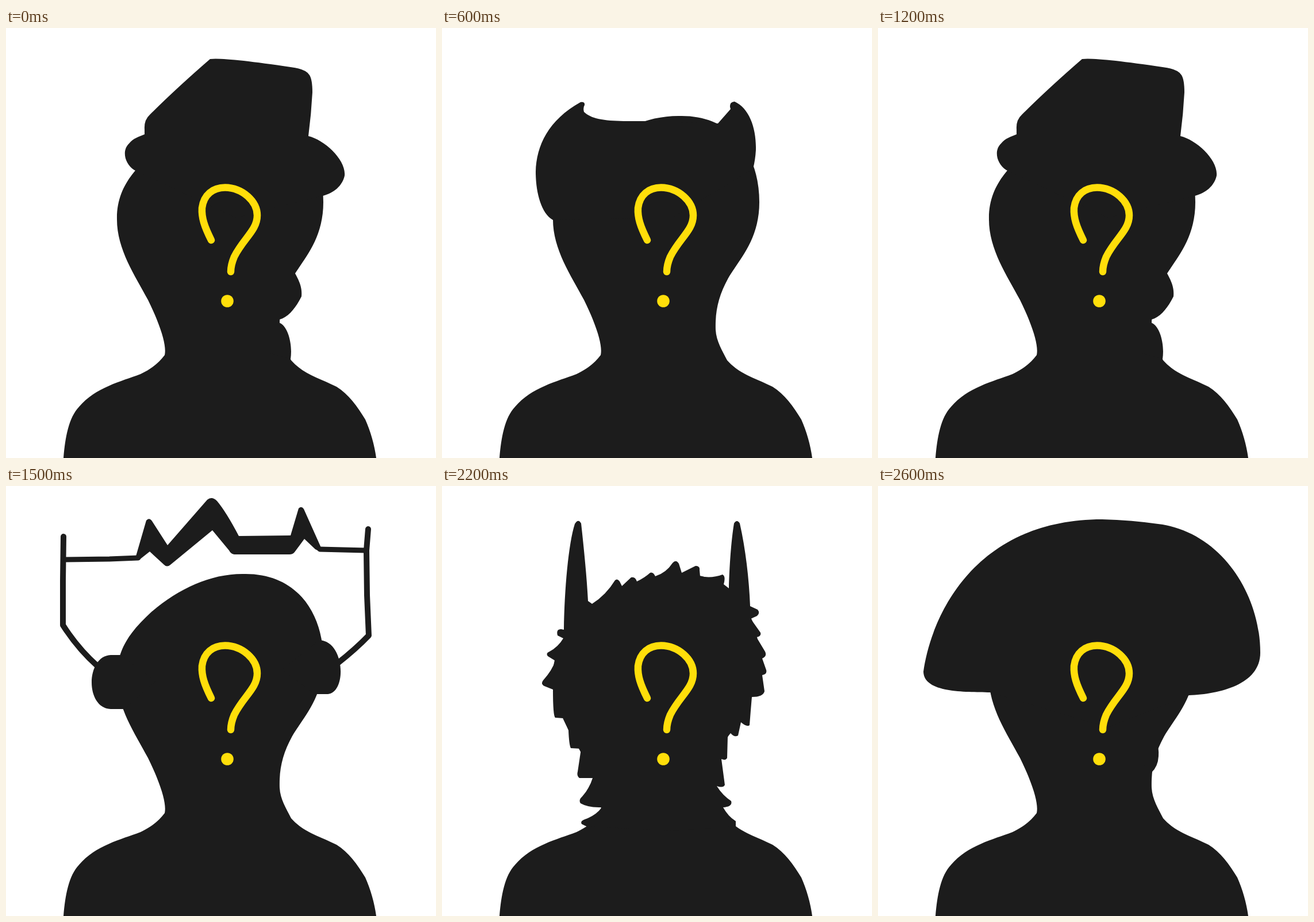
An HTML page that plays this animation: 748 px wide and 748 px high, repeating every 2700 ms.

```html
<!DOCTYPE html>
<html lang="en">
<head>
<meta charset="utf-8">
<title>Guess who</title>
<style>
  html, body { margin: 0; width: 100%; height: 100%; overflow: hidden; background: #fff; }
  svg { display: block; width: 100vw; height: 100vh; fill: #1c1c1c; }
  .look { visibility: hidden; }
  .line { fill: none; stroke: #1c1c1c; stroke-width: 10; stroke-linecap: round; stroke-linejoin: round; }
  .mark { fill: none; stroke: #ffde0a; stroke-width: 12.5; stroke-linecap: round; }
  .dot { fill: #ffde0a; }
</style>
</head>
<body>
<svg viewBox="0 0 748 748">
  <path d="M100 748C103 712 109 678 127 659C156 625 200 615 234 602C255 592 267 581 276 569C280 552 268 516 247 473C224 430 193 385 193 333C192 280 222 248 253 219C300 179 355 153 411 153C505 150 552 220 552 303C552 370 515 405 498 435C481 466 475 492 476 525C477 545 488 562 496 578C517 602 545 609 575 624C596 637 611 658 625 681C634 701 641 725 644 748Z"/>

  <g class="look" id="hat">
    <path d="M223 247C205 235 202 212 214 201C221 192 231 189 241 185V176Q240 160 250 151Q295 106 355 54Q380 51 495 68Q522 71 528 82Q533 90 533 112Q531 150 526 188C555 195 592 230 589 257C585 275 570 287 551 292L400 330Z"/>
    <path d="M503 427C513 445 515 455 514 467C505 485 492 503 476 507V513C490 518 499 550 495 576L440 560V427Z"/>
  </g>

  <g class="look" id="horns">
    <path d="M193 334C172 322 163 285 163 250C164 205 185 160 241 129Q249 128 248 134Q245 139 247 146C265 163 300 162 352 162L480 166L502 141Q498 129 509 128C535 140 547 175 546 212Q545 230 541 245L400 330Z"/>
  </g>

  <g class="look" id="spikes">
    <path class="line" d="M100 88L99 165V242Q125 283 160 314M630 75L627 112L628 190L631 260Q608 284 576 309"/>
    <path class="line" style="stroke-width:9" d="M105 128L180 127L230 125M546 110L625 112"/>
    <path d="M226 122L244 60Q249 54 254 61L281 103L350 24Q358 17 367 26Q383 45 405 87L495 86L509 39Q514 34 518 40L548 107L546 114L538 110L519 92L502 115Q499 119 493 119H397Q391 118 388 112L359 77L286 137Q280 142 275 137L250 114L231 129Z"/>
    <path d="M200 294H182C139 296 137 386 182 388H206L260 340ZM545 268C590 270 593 359 560 362H538L480 320Z"/>
  </g>

  <g class="look" id="crown">
    <path d="M209 267L173 234Q148 236 138 214L96 189Q91 183 98 178Q122 176 151 183L128 143Q124 129 138 129Q160 130 183 136L169 86Q169 75 180 77L222 101L213 58Q214 47 224 51L260 65L252 25Q255 15 264 20L308 58L320 38Q326 20 328 0V-5H346V0Q354 25 360 52Q381 70 364 93Q370 120 374 157L360 260Z"/>
    <path d="M518 404Q533 425 550 431Q562 430 560 406Q556 400 549 403Q541 401 543 391C550 383 567 382 575 391C584 402 586 428 583 438C576 485 530 496 479 481L450 430Z"/>
  </g>

  <g class="look" id="fur">
    <path d="M212 250C213 180 220 100 231 66Q237 56 242 65C247 110 252 160 254 200L261 205Q285 190 301 164Q305 160 309 166L313 174L329 159Q336 157 339 166Q352 160 362 151Q367 149 371 157Q390 151 401 134Q407 127 412 135L417 151L441 139Q449 139 448 146L449 157Q470 161 488 154Q494 157 490 171L499 178C500 140 503 95 508 65Q513 57 518 65C528 110 534 160 536 209L549 215Q554 221 548 226L537 231L554 255Q556 262 547 263L562 288Q566 296 557 300L564 320Q566 327 557 329L561 357Q559 367 539 367Q537 390 535 416Q531 420 520 411L515 434Q509 438 502 430L497 436L496 473Q494 478 486 475L492 520Q489 526 478 522Q488 538 503 548Q506 558 489 559Q498 575 511 583V592L400 600L251 592L243 588Q240 583 248 580Q268 573 278 559Q255 560 241 552Q237 546 244 540Q257 525 262 508H239Q234 504 236 497L242 457L224 456Q221 450 220 425L211 404L197 403Q193 400 193 354L178 348Q171 344 176 338Q192 320 197 304L184 296Q180 291 187 288Q202 280 211 265L201 260Q198 249 207 249Z"/>
  </g>

  <g class="look" id="dome">
    <path d="M195 359C150 358 80 360 79 323C92 230 165 58 390 58Q440 59 495 67C600 85 665 190 665 290C665 345 595 362 541 364L400 420Z"/>
    <path d="M485 452Q489 455 488 470Q487 488 476 498L455 480Z"/>
  </g>

  <path class="mark" d="M357 369C345 345 340 330 341 313C344 290 360 277.5 381 277.5C412 278 437 302 437 326C437 352 413 366 397 398C392 410 391 416 391 424"/>
  <circle class="dot" cx="385" cy="475" r="10.8"/>
</svg>
<script>
  const STEP = 100;
  const order = `hat horns bare fur hat bare horns fur hat
    bare horns fur hat bare horns spikes fur spikes
    hat crown horns bare fur crown hat fur dome`.split(/\s+/);
  const looks = [...document.querySelectorAll('.look')];
  const start = performance.now();

  function draw(now) {
    const t = Math.max(0, now - start);
    const name = order[Math.floor(t / STEP) % order.length];
    for (const look of looks) {
      look.style.visibility = look.id === name ? 'visible' : 'hidden';
    }
    requestAnimationFrame(draw);
  }
  draw(start);
</script>
</body>
</html>
```
